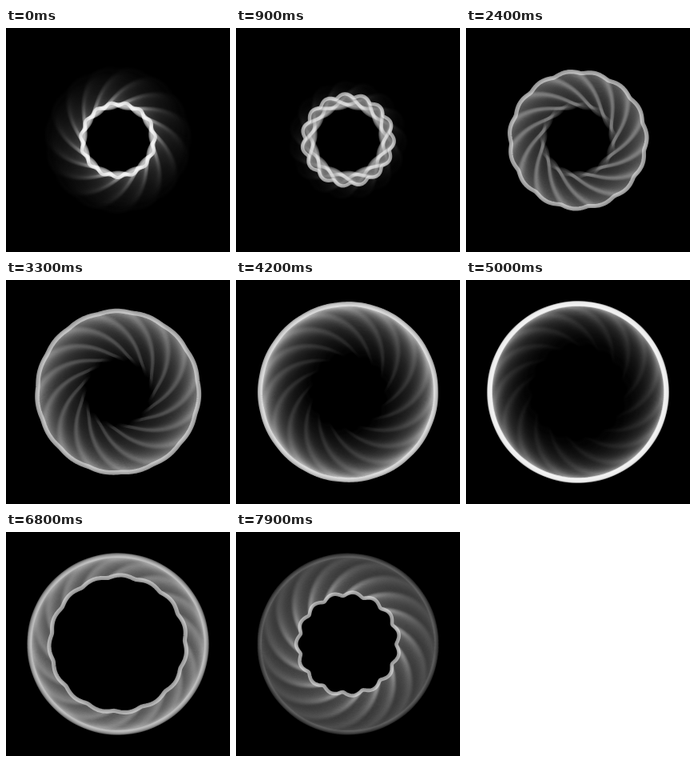
Recreate the animation shown at these times as an HTML page with a canvas. Size 280 by 280 pixels, loop 8 s.

```html
<!DOCTYPE html>
<html lang="en">
<head>
<meta charset="utf-8">
<title>Breathing ring</title>
<style>
  html, body { margin: 0; width: 100%; height: 100%; overflow: hidden; background: #000; }
  canvas { display: block; width: 280px; height: 280px; }
</style>
</head>
<body>
<canvas id="stage" width="280" height="280"></canvas>
<script>
const ctx = document.getElementById('stage').getContext('2d');
const LOOP = 8;          // seconds
const PETALS = 15;
const POINTS = PETALS * 18;
const TRAIL = 4.1;       // seconds until a stroke has faded out
const STEP = 0.04;
const RAD = Math.PI / 180;

const ringRadius = t => 77 + 34 * Math.cos(0.605 * (t - 4.6));
const ringTurn = t => (-83.7 - 19.05 * (t - 1.6)) * RAD;

// Scalloped ring: petals flatten into a circle as it widens.
function ringPath(t) {
  const radius = ringRadius(t);
  const turn = ringTurn(t);
  const depth = 5.2 * Math.min(1, Math.max(0, (113 - radius) / 48));
  ctx.beginPath();
  for (let i = 0; i < POINTS; i++) {
    const a = i / POINTS * Math.PI * 2;
    const petal = Math.sqrt(Math.cos(a * PETALS / 2) ** 2 + 0.03);
    const r = radius + depth * (petal - 0.67);
    ctx.lineTo(140 + r * Math.cos(a + turn), 140 + r * Math.sin(a + turn));
  }
  ctx.closePath();
  return radius;
}

function strokeRing(t, alpha) {
  const radius = ringPath(t);
  ctx.lineWidth = 3 + radius * 0.025;
  ctx.strokeStyle = `rgba(255,255,255,${alpha})`;
  ctx.stroke();
}

function draw(t) {
  ctx.fillStyle = '#000';
  ctx.fillRect(0, 0, 280, 280);
  ctx.lineJoin = 'round';
  for (let age = TRAIL; age > 0; age -= STEP) {
    strokeRing(t - age, 0.085 * (1 - age / TRAIL) ** 1.4);
  }
  strokeRing(t, 0.55);
}

function tick() {
  draw(performance.now() / 1000 % LOOP);
  requestAnimationFrame(tick);
}
tick();
</script>
</body>
</html>
```
